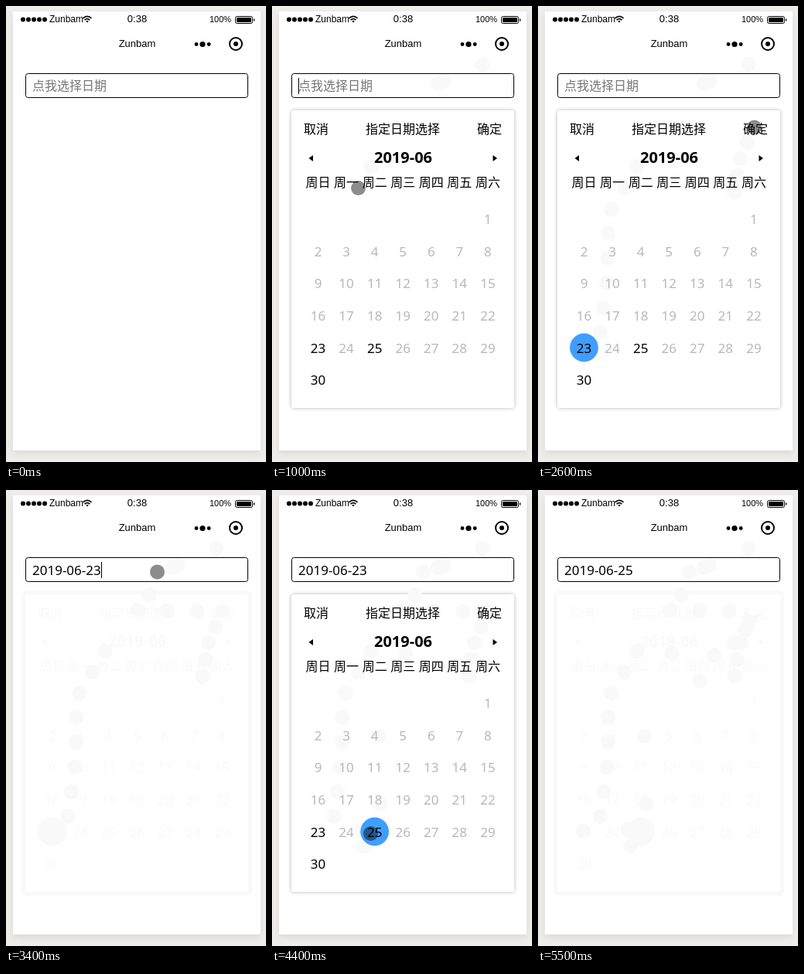
Recreate the animation shown at these times as an HTML page. Size 336 px wide and 590 px high, loop 6.2 s.

```html
<!DOCTYPE html>
<html lang="zh-CN">
<head>
<meta charset="utf-8">
<title>日期选择</title>
<style>
  html, body { margin: 0; width: 100%; height: 100%; overflow: hidden; background: #eeede9; }
  svg { display: block; width: 336px; height: 590px; }
  text { font: 16px "Noto Sans CJK SC", "Noto Sans CJK", sans-serif; }
  .bar text { font: 13px "Liberation Sans", Arial, sans-serif; }
  .bar .carrier { font-size: 12px; }
  .bar .charge { font-size: 11px; }
  .num { font: 17px "Noto Sans", "Open Sans", sans-serif; }
  .month { font: bold 20px "Noto Sans", "Open Sans", sans-serif; }
  .mid { text-anchor: middle; }
  .phone { fill: #fff; filter: drop-shadow(0 4px 5px rgba(0, 0, 0, .08)); }
  .panel { fill: #fff; filter: drop-shadow(0 0 2.5px rgba(0, 0, 0, .3)); }
  .halo { display: none; fill: none; stroke: #f9f9f9; stroke-width: 5; }
  .muted { fill: #b8b8b8; }
  #trail { fill: #f9f9f9; }
  #picked { fill: #409eff; }
  .closed .panel { display: none; }
  .closed .halo { display: inline; }
  .closed #picked, .closed #labels * { fill: #f9f9f9; }
</style>
</head>
<body>
<svg viewBox="0 0 336 590">
  <rect class="phone" x="9" y="7" width="320" height="568"/>
  <g class="bar">
    <path d="M22 17.5h29" stroke="#000" stroke-width="6" stroke-linecap="round" stroke-dasharray="0 7"/>
    <text class="carrier" x="56" y="21">Zunbam</text>
    <g fill="none" stroke="#000" stroke-width="1.7">
      <path d="M99.5 15.8q5.500-5 11 0M101.600 18.200q3.400-3 6.800 0"/>
      <path d="M103.200 19.600q1.800-1.400 3.600 0l-1.800 2z" fill="#000" stroke="none"/>
    </g>
    <text class="mid" x="169.5" y="21">0:38</text>
    <text class="charge" x="263" y="21">100%</text>
    <rect x="296.5" y="13.5" width="22" height="9" rx="2" fill="none" stroke="#000"/>
    <rect x="298" y="15" width="19" height="6" rx="1"/>
    <path d="M320 16q3 2 0 4z"/>
    <text class="mid" x="169.5" y="53">Zunbam</text>
    <circle cx="246" cy="49.5" r="2.4"/>
    <circle cx="254" cy="49.5" r="3.6"/>
    <circle cx="262.2" cy="49.5" r="2.4"/>
    <circle cx="297" cy="49" r="8" fill="none" stroke="#000" stroke-width="2"/>
    <circle cx="297" cy="49" r="3"/>
  </g>
  <g id="card">
    <rect class="panel" x="25" y="135" width="288" height="385" rx="3"/>
    <rect class="halo" x="22.5" y="132.5" width="293" height="390" rx="5"/>
  </g>
  <g id="trail"></g>
  <g id="calendar">
    <circle id="picked" cy="442" r="18.4"/>
    <g id="labels">
      <text x="41" y="165">取消</text>
      <text x="121" y="165">指定日期选择</text>
      <text x="265" y="165">确定</text>
      <path d="M53 193v8l-5.500-4z"/>
      <path d="M285.500 193v8l5.500-4z"/>
      <text class="month mid" x="169.5" y="203">2019-06</text>
    </g>
  </g>
  <circle id="wipe" cx="279.5" cy="152.5" r="9.5" fill="#fff"/>
  <rect x="25.5" y="87.5" width="287" height="31" rx="3" fill="none" stroke="#000"/>
  <text id="hint" x="34" y="109" fill="#757575">点我选择日期</text>
  <text id="value" class="num" x="34" y="110"></text>
  <rect id="caret" y="93" width="1" height="21"/>
  <circle id="pointer" r="9.5" fill-opacity=".45"/>
</svg>
<script>
const LOOP = 6200;
const STEP = 100; // the pointer moves in hard steps
const $ = id => document.getElementById(id);
const show = (node, on) => node.setAttribute('display', on ? 'inline' : 'none');
const inSpan = (t, from, to) => t >= from && t < to;
const columnX = i => 59.5 + 36.57 * i;

function set(node, attrs) {
  for (const name in attrs) node.setAttribute(name, attrs[name]);
}

function make(tag, attrs, text = '') {
  const node = document.createElementNS('http://www.w3.org/2000/svg', tag);
  set(node, attrs);
  node.textContent = text;
  return node;
}

[...'日一二三四五六'].forEach((day, i) =>
  $('labels').append(make('text', { class: 'mid', x: columnX(i), y: 234 }, '周' + day)));

for (let day = 1; day <= 30; day++) {
  const cell = day + 5; // the month starts on a Saturday
  const enabled = [23, 25, 30].includes(day);
  $('labels').append(make('text', {
    class: enabled ? 'num mid' : 'num mid muted',
    x: columnX(cell % 7),
    y: 282 + 41.65 * Math.floor(cell / 7)
  }, day));
}

// Each gesture follows its path from start to end, then rests until hide.
const gestures = [
  { start: 100, end: 400, hide: 800, power: 5, path: 'M272 75.5L214.5 100.5' },
  { start: 900, end: 1700, hide: 2100, power: 1, path: 'M128 208L91 270L90 351L79 432L58.5 441' },
  { start: 2100, end: 2500, hide: 2900, power: 1, path: 'M254 241L262 195L279.5 157' },
  { start: 2900, end: 3300, hide: 3500, power: 1, path: 'M247 157L162 155L201 122L195.5 106' },
  { start: 3600, end: 4100, hide: 4500, power: 2, path: 'M173 211L136 324L141 430L120 462L107 436L127.5 444.5' },
  { start: 4500, end: 5100, hide: 5500, power: 2, path: 'M209 247L233 205L262 195L279.5 152.5' }
];

const stops = gestures.flatMap(({ start, end, hide, power, path }) => {
  const curve = make('path', { d: path });
  const count = (end - start) / STEP;
  return Array.from({ length: count + 1 }, (_, i) => {
    const eased = 1 - (1 - i / count) ** power;
    const { x, y } = curve.getPointAtLength(eased * curve.getTotalLength());
    const mark = make('circle', { cx: x, cy: y, r: 9.7 });
    $('trail').append(mark);
    const from = start + i * STEP;
    return { x, y, mark, from, to: i < count ? from + STEP : hide };
  });
});

function renderPointer(t) {
  const stop = stops.find(({ from, to }) => inSpan(t, from, to));
  show($('pointer'), stop);
  if (stop) set($('pointer'), { cx: stop.x, cy: stop.y });
  for (const { mark, to } of stops) show(mark, t >= to);
}

function renderCalendar(t) {
  const open = inSpan(t, 800, 2800) || inSpan(t, 3500, 5300);
  for (const node of [$('card'), $('calendar')]) {
    show(node, t >= 800);
    node.classList.toggle('closed', !open);
  }
  show($('picked'), t >= 1900);
  set($('picked'), { cx: columnX(t < 4300 ? 0 : 2) });
  show($('wipe'), t >= 5500);
}

function renderField(t) {
  const empty = t < 2800;
  show($('hint'), empty);
  $('value').textContent = empty ? '' : t < 5300 ? '2019-06-23' : '2019-06-25';

  const focused = empty ? 600 : 3300;
  const blinkOn = (t - focused) % 1000 < 500;
  show($('caret'), inSpan(t, focused, focused + 1100) && blinkOn);
  set($('caret'), { x: empty ? 34 : 123 });
}

function tick() {
  const t = performance.now() % LOOP;
  renderPointer(t);
  renderCalendar(t);
  renderField(t);
  requestAnimationFrame(tick);
}
tick();
</script>
</body>
</html>
```
